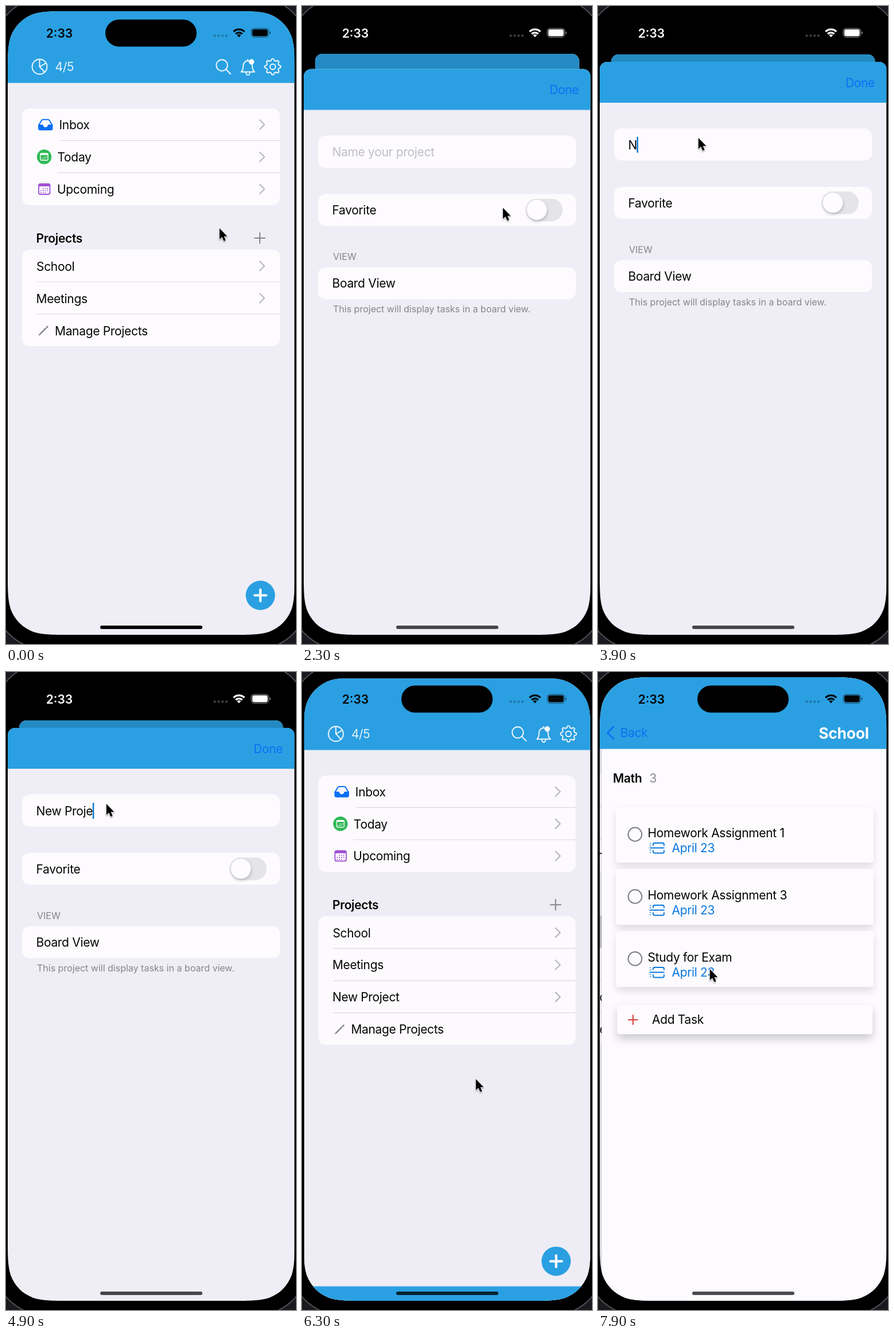
Animation of 505x1108 px, one loop 8000 ms. Source, as an HTML page:

```html
<!DOCTYPE html>
<html lang="en">
<head>
<meta charset="utf-8">
<title>Projects app</title>
<style>
  html, body { margin: 0; width: 100%; height: 100%; overflow: hidden; background: #000; }
  svg { display: block; width: 505px; height: 1108px; }
  text { font: 400 21px Inter, Roboto, sans-serif; letter-spacing: -.32px; fill: #050505; white-space: pre; }
  .bold { font-weight: 600; }
  .note { font-size: 16px; letter-spacing: 0; fill: #858489; }
  .blue { fill: #2aa0e2; }
  .paper { fill: #efeef6; }
  .card { fill: #fdfbfe; }
  .line { fill: none; stroke-linecap: round; stroke-linejoin: round; }
  .rule { stroke: #dbdadf; stroke-width: 1.2; }
  .link { fill: #0a70f5; }
  .date { fill: #0a78dc; }
</style>
</head>
<body>
<svg viewBox="0 0 505 1108" xmlns="http://www.w3.org/2000/svg">
  <defs>
    <clipPath id="screenClip"><path id="screenShape"/></clipPath>
    <clipPath id="rootClip"><rect id="rootShape" x="3" y="9" width="499.5" height="1083"/></clipPath>
    <filter id="soft" x="-10%" y="-40%" width="120%" height="200%">
      <feDropShadow dx="0" dy="7" stdDeviation="7" flood-opacity=".12"/>
    </filter>
    <filter id="strong" x="-10%" y="-60%" width="120%" height="260%">
      <feDropShadow dx="0" dy="8" stdDeviation="8" flood-opacity=".2"/>
    </filter>
    <filter id="knobShadow" x="-40%" y="-40%" width="180%" height="180%">
      <feDropShadow dx="1" dy="3" stdDeviation="2.5" flood-opacity=".2"/>
    </filter>
    <filter id="cursorShadow" x="-50%" y="-50%" width="200%" height="200%">
      <feDropShadow dx="0" dy="1.5" stdDeviation="1.3" flood-opacity=".4"/>
    </filter>
    <path id="chevron" class="line" d="M442 -8l8 8l-8 8" stroke="#bbbabf" stroke-width="2.3"/>
  </defs>

  <!-- phone body -->
  <rect width="505" height="1108" fill="#1b191f"/>
  <rect x="-21" y="-15" width="547" height="1132" rx="90" fill="#000" stroke="#59585d" stroke-width="1.6"/>

  <g clip-path="url(#screenClip)">
    <g id="root"><g clip-path="url(#rootClip)">
      <g id="list">
        <rect class="paper" x="3" y="9" width="600" height="1083"/>
        <rect class="card" x="28" y="178" width="449" height="168" rx="13"/>
        <path class="rule" d="M94 233.7H477M89 289.7H477"/>
        <g class="line" stroke="#0a6ff5" stroke-width="2">
          <path d="M57 207l5-8.5q.8-1.3 2.5-1.3h8.5q1.7 0 2.5 1.3l5 8.5"/>
          <path fill="#0a6ff5" d="M57 207h6.5q1 4.5 5.2 4.5t5.3-4.5h6.5v5.5q0 2.5-2.5 2.5h-18.5q-2.5 0-2.5-2.5z"/>
        </g>
        <circle cx="66.5" cy="262" r="12.7" fill="#30b957"/>
        <g class="line" stroke="#fff">
          <rect x="60" y="256" width="13" height="12" rx="2" stroke-width="1.3"/>
          <path d="M60.5 257.5h12" stroke-width="2.5"/>
          <path d="M65.5 262.5h6M62.5 265.3h6" stroke-width="1.6" stroke-dasharray="0 2.7"/>
        </g>
        <g class="line" stroke="#a04fd2">
          <rect x="57" y="309" width="19.5" height="18" rx="3" stroke-width="1.8"/>
          <path d="M58.5 311h16.5" stroke-width="4.5"/>
          <path d="M64.5 317h9M61 320.5h12.5M61 324h9" stroke-width="1.9" stroke-dasharray="0 3.7"/>
        </g>
        <text x="92.5" y="214">Inbox</text>
        <text x="89.5" y="270">Today</text>
        <text x="89" y="326">Upcoming</text>
        <use href="#chevron" y="206"/><use href="#chevron" y="262"/><use href="#chevron" y="318"/>

        <text class="bold" x="52.5" y="411">Projects</text>
        <path class="line" d="M433 403h18M442 394v18" stroke="#858489" stroke-width="2"/>
        <rect id="projectCard" class="card" x="28" y="423" width="449" height="168" rx="13"/>
        <path class="rule" d="M54 479H477M54 535H477"/>
        <path id="pressed" fill="#c7c6ca" d="M28 479V436a13 13 0 0 1 13-13H464a13 13 0 0 1 13 13V479z"/>
        <text x="53" y="459.5">School</text>
        <text x="52.5" y="515.5">Meetings</text>
        <use href="#chevron" y="451.5"/><use href="#chevron" y="507.5"/>
        <g id="added">
          <path class="rule" d="M54 591H477"/>
          <text x="52.5" y="571.5">New Project</text>
          <use href="#chevron" y="563.5"/>
        </g>
        <g id="manage">
          <path d="M58.5 570.5L70 559" stroke="#7f7e83" stroke-width="2.4"/>
          <path d="M71.2 557.8l1-1" class="line" stroke="#7f7e83" stroke-width="2.6"/>
          <path d="M56.5 572.5l1.2-3l1.8 1.8z" fill="#7f7e83"/>
          <text x="85" y="571.5">Manage Projects</text>
        </g>
        <circle class="blue" cx="443" cy="1023.5" r="25.5"/>
        <path class="line" d="M433 1023.5h20M443 1013.5v20" stroke="#fff" stroke-width="4.2"/>
        <rect id="listDim" x="3" y="9" width="600" height="1083"/>
      </g>
      <rect id="strip" class="blue" x="3" y="1067" width="500" height="26"/>

      <g id="tasks">
        <rect x="3" y="9" width="500" height="1083" fill="#fdfbff"/>
        <text class="bold" x="22.5" y="192">Math</text>
        <text x="86" y="192" style="fill:#8b8a8f">3</text>
        <g id="cards"></g>
        <rect class="card" x="30" y="578" width="444.5" height="51" rx="5" filter="url(#strong)"/>
        <path class="line" d="M49.5 604h16M57.5 596v16" stroke="#d9423d" stroke-width="2"/>
        <text x="90.5" y="611">Add Task</text>
      </g>

      <rect class="blue" x="3" y="9" width="500" height="124.6"/>
      <g id="tools" class="line" stroke="#f4faff" stroke-width="1.9">
        <circle cx="58.5" cy="105.5" r="13"/>
        <path d="M58.5 92.5V105.5L70 99M58.5 105.5L67.5 115"/>
        <text x="85.5" y="113" stroke="none" style="fill:#e6f3fc">4/5</text>
        <circle cx="376" cy="103" r="9.7"/>
        <path d="M383 110L391 118"/>
        <path d="M409.5 114.5q3.5-3.5 3.5-9q0-9.5 8-10.5q8 1 8 10.5q0 5.5 4 9zM418 116q.5 4 3.3 4t3.3-4M421 95v-2"/>
        <circle cx="427.5" cy="97" r="4.7" fill="#fff" stroke="none"/>
        <path id="gear"/>
        <circle cx="464.5" cy="105.5" r="4.8"/>
      </g>
      <g id="taskBar">
        <path class="line" d="M27 95l-10.5 10.5l10.5 10.5" stroke="#0a70f5" stroke-width="2.6"/>
        <text id="back" class="link" x="38.5" y="113">Back</text>
        <text x="471.5" y="115.5" text-anchor="end" style="font-size:26.5px;font-weight:700;fill:#fff">School</text>
      </g>
      <rect id="rootDim" x="3" y="9" width="500" height="1083"/>
    </g></g>

    <g id="sheet">
      <path class="paper" d="M3 1092V110a13 13 0 0 1 13-13H489.5a13 13 0 0 1 13 13V1092z"/>
      <path class="blue" d="M3 168V110a13 13 0 0 1 13-13H489.5a13 13 0 0 1 13 13V168z"/>
      <text class="link" x="482" y="140.5" text-anchor="end">Done</text>
      <rect class="card" x="28" y="212.5" width="449" height="56" rx="13"/>
      <text id="field" x="52.5" y="248.5"></text>
      <rect id="caret" y="227" width="2.5" height="28" rx="1" fill="#0a7bd0"/>
      <rect class="card" x="28" y="314" width="449" height="55.5" rx="13"/>
      <text x="52.5" y="349.5">Favorite</text>
      <rect x="389" y="322" width="65" height="39.5" rx="19.7" fill="#e5e4e7"/>
      <circle cx="409" cy="341.7" r="17.3" fill="#fefcff" filter="url(#knobShadow)"/>
      <text class="note" x="54" y="429">VIEW</text>
      <rect class="card" x="28" y="441.5" width="449" height="55.5" rx="13"/>
      <text x="52.5" y="477">Board View</text>
      <text class="note" x="54" y="520">This project will display tasks in a board view.</text>
    </g>

    <!-- status bar -->
    <rect x="173" y="23.5" width="159" height="47" rx="23.5"/>
    <g id="status" fill="currentColor">
      <text class="bold" x="69.7" y="54.5" style="fill:currentColor;letter-spacing:0">2:33</text>
      <path class="line" d="M363.5 51.5h21" stroke="currentColor" stroke-opacity=".24" stroke-width="4.4" stroke-dasharray="0 6.8"/>
      <g fill="none" stroke="currentColor" stroke-width="3.2">
        <path d="M396.3 44.5a13.3 13.3 0 0 1 18.8 0M400 48.5a8.2 8.2 0 0 1 11.4 0"/>
      </g>
      <path d="M402.3 50.7a4.8 4.8 0 0 1 6.8 0l-3.4 3.5z"/>
      <rect x="427" y="38.8" width="30.5" height="15.5" rx="5" fill="none" stroke="currentColor" stroke-opacity=".45" stroke-width="1.3"/>
      <rect x="428.8" y="40.6" width="26.9" height="11.9" rx="3.4"/>
      <path d="M459 44v5q2-.8 2-2.5t-2-2.5z" opacity=".5"/>
    </g>
    <rect id="homeBar" x="164" y="1076" width="178" height="6" rx="3"/>
  </g>

  <g id="cursor" filter="url(#cursorShadow)">
    <path d="M.8 1V20.3L5.2 16.2L8.3 23.3L11.7 21.9L8.7 14.9H14.3z" stroke="#fff" stroke-width="1.3" stroke-linejoin="round" paint-order="stroke"/>
  </g>
</svg>

<script>
const LOOP = 8000, STEP = 100;
const OPEN = 1950, CLOSE = 6005, PRESS = 7500, PUSH = 7514;
const WIDTH = 499.5;
const NAME = 'New Project';
const KEYS = [3900, 4000, 4100, 4200, 4500, 4600, 4700, 4800, 4900, 5100, 5300];
const PATH = [
  [800, 371, 385], [1300, 425, 425], [1600, 446, 441], [1800, 441, 402], [2000, 441, 402],
  [2800, 196, 262], [3200, 174, 228], [5300, 174, 228], [5800, 458, 130], [6000, 458, 130],
  [6300, 302, 706], [6700, 262, 590], [6800, 262, 590], [7100, 202, 437],
  [7600, 202, 437], [7900, 194, 515]
];

const $ = id => document.getElementById(id);
const set = (id, name, value) => $(id).setAttribute(name, value);
const show = (id, on) => set(id, 'display', on ? 'inline' : 'none');
const move = (id, x, y) => set(id, 'transform', `translate(${x} ${y})`);

// Share of a critically damped spring still to travel.
function left(t, start) {
  const a = Math.max(0, t - start) * 0.01826;
  return (1 + a) * Math.exp(-a);
}

function cursorAt(t) {
  const i = PATH.findIndex(p => p[0] > t);
  if (i === 0) return PATH[0].slice(1);
  if (i < 0) return PATH[PATH.length - 1].slice(1);
  const [t0, x0, y0] = PATH[i - 1], [t1, x1, y1] = PATH[i];
  const k = (t - t0) / (t1 - t0);
  return [x0 + (x1 - x0) * k, y0 + (y1 - y0) * k];
}

// Rectangle whose corners bend with continuous curvature.
function smoothRect(x, y, w, h, r) {
  const bend = [[0, 1.528], [0, 1.088], [0, .868], [.075, .631], [.169, .372],
    [.372, .169], [.631, .075], [.868, 0], [1.088, 0], [1.528, 0]];
  const corner = (cx, cy, sx, sy, flip) => {
    const p = bend.map(([a, b]) => `${cx + sx * a * r} ${cy + sy * b * r}`);
    if (flip) p.reverse();
    return `${p[0]}C${p.slice(1).join(' ')}`;
  };
  return `M${corner(x, y, 1, 1, false)}L${corner(x + w, y, -1, 1, true)}` +
    `L${corner(x + w, y + h, -1, -1, false)}L${corner(x, y + h, 1, -1, true)}z`;
}

function gearPath() {
  const points = [];
  for (let i = 0; i < 32; i++) {
    const a = (i - 1.5) * Math.PI / 16;
    const r = i % 4 === 1 || i % 4 === 2 ? 14 : 10.8;
    points.push(`${(464.5 + r * Math.sin(a)).toFixed(1)} ${(105.5 - r * Math.cos(a)).toFixed(1)}`);
  }
  return `M${points.join('L')}z`;
}

function taskCard(title, i) {
  return `<g transform="translate(0 ${i * 108})">
    <rect class="card" x="28" y="234" width="448.5" height="97" rx="5" filter="url(#soft)"/>
    <circle cx="61" cy="282" r="11.8" fill="none" stroke="#858489" stroke-width="2.2"/>
    <text x="83" y="287">${title}</text>
    <g class="line" stroke="#0a78dc" stroke-width="1.9">
      <path d="M87 305.5h24.5M92.5 301v-1.5q0-2.5 2.5-2.5h14q2.5 0 2.5 2.5v1.5M92.5 310v2q0 2.5 2.5 2.5h14q2.5 0 2.5-2.5v-2"/>
      <path d="M87.5 297.5v4.5M87.5 309.5v4.5" stroke-dasharray="0 4"/>
    </g>
    <text class="date" x="125" y="313">April 23</text>
  </g>`;
}

function drawSheet(t) {
  const up = t < CLOSE ? 1 - left(t, OPEN) : left(t, CLOSE);
  const scale = 1 - 0.08 * up;
  set('root', 'transform', `translate(252.75 ${9 + 75 * up}) scale(${scale}) translate(-252.75 -9)`);
  set('rootShape', 'rx', 69 - 55 * Math.min(1, up * 1.2));
  set('rootDim', 'opacity', 0.14 * up);
  show('sheet', up > 0.001);
  move('sheet', 0, 1000 * (1 - up));
  const tone = Math.round(255 * up);
  $('status').style.color = `rgb(${tone},${tone},${tone})`;
  show('strip', t >= CLOSE && t < 6500);

  const added = t >= CLOSE;
  show('added', added);
  set('projectCard', 'height', added ? 224 : 168);
  move('manage', 0, added ? 56 : 0);
  return up;
}

function drawField(t) {
  const typed = NAME.slice(0, KEYS.filter(k => k <= t).length);
  const field = $('field');
  field.textContent = typed || 'Name your project';
  field.style.fill = typed ? '#050505' : '#c0bfc4';
  show('caret', t >= 3800);
  set('caret', 'x', typed ? 52 + field.getComputedTextLength() : 53);
}

function drawPush(t) {
  const rest = left(t, PUSH), done = 1 - rest;
  show('pressed', t >= PRESS);
  move('list', -0.3 * WIDTH * done, 0);
  set('listDim', 'opacity', 0.1 * done);
  show('tasks', done > 0);
  move('tasks', WIDTH * rest, 0);
  set('tools', 'opacity', rest < 0.02 ? 0 : rest);
  set('taskBar', 'opacity', done);
  move('back', 40 * rest, 0);
  return done;
}

// The home bar pales over sheets and pages and darkens again slowly.
function drawHomeBar(t, up, pushed) {
  const fade = t < CLOSE ? up : Math.max(0, 1 - (t - CLOSE) / 1000);
  set('homeBar', 'opacity', 1 - 0.3 * Math.max(fade, Math.min(1, pushed * 2)));
}

function draw(t) {
  const up = drawSheet(t);
  drawField(t);
  drawHomeBar(t, up, drawPush(t));
  move('cursor', ...cursorAt(t));
}

set('screenShape', 'd', smoothRect(3, 9, WIDTH, 1083, 70));
set('gear', 'd', gearPath());
$('cards').innerHTML = ['Homework Assignment 1', 'Homework Assignment 3', 'Study for Exam'].map(taskCard).join('');

const begin = performance.now();
function tick() {
  const t = (performance.now() - begin) % LOOP;
  draw(Math.floor(t / STEP) * STEP);
  requestAnimationFrame(tick);
}
tick();
</script>
</body>
</html>
```
